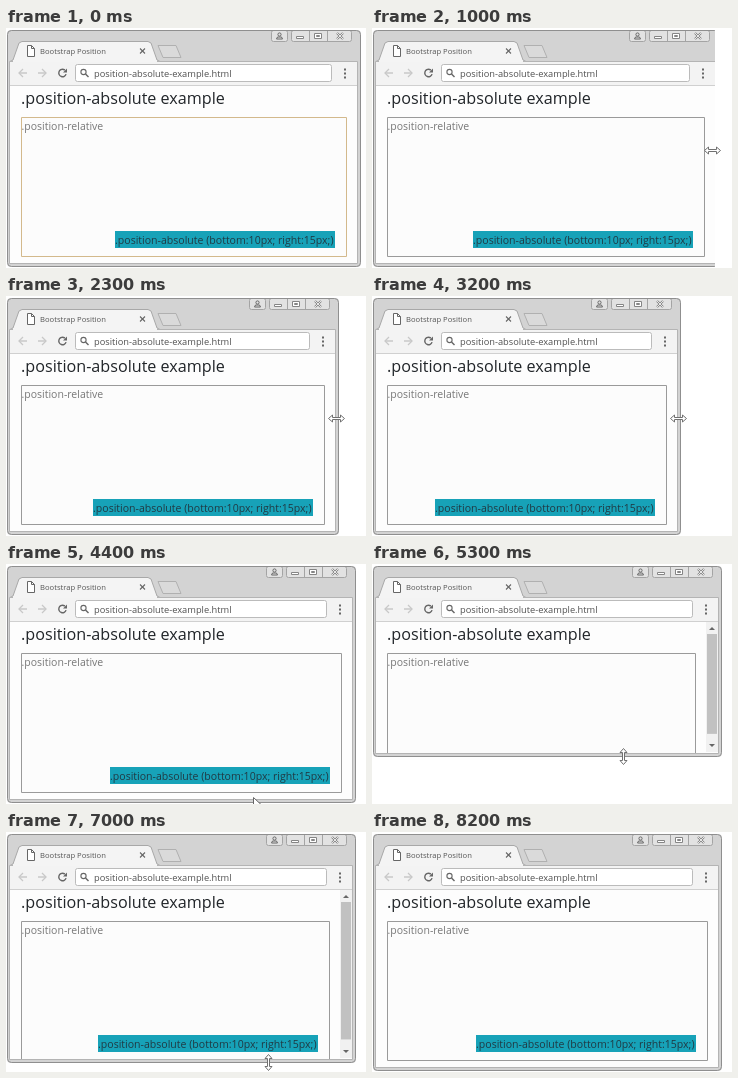
An HTML page with a canvas that plays this animation: 360 px wide and 240 px high, repeating every 8.3 s.

```html
<!DOCTYPE html>
<html lang="en">
<head>
<meta charset="utf-8">
<title>Position</title>
<style>
html, body { margin: 0; width: 100%; height: 100%; overflow: hidden; background: #fff; }
canvas { display: block; width: 360px; height: 240px; }
</style>
</head>
<body>
<canvas id="stage" width="360" height="240"></canvas>
<script>
const ctx = document.getElementById('stage').getContext('2d');
const LOOP = 8300;
const FONT = '"Open Sans", "Noto Sans", sans-serif';
const EDGE = '#8f8f8f', FRAME = '#d3d3d3', ICON = '#666', INK = '#212529';

const progress = (t, start, end) => Math.min(1, Math.max(0, (t - start) / (end - start)));
const drag = (t, start, end, distance) => distance * progress(t, start, end);

// The window is dragged in and out by its right edge, then by its bottom edge.
const rightEdge = t => Math.round(354 + drag(t, 900, 1600, -55) + drag(t, 1800, 2600, 52)
  + drag(t, 2700, 3200, -43) + drag(t, 3200, 3900, 41));
const bottomEdge = t => Math.round(238 + drag(t, 4800, 5300, -46) + drag(t, 5300, 5900, 45)
  + drag(t, 6000, 6500, -45) + drag(t, 6500, 7100, 46));

function fill(x, y, w, h, color) {
  ctx.fillStyle = color;
  ctx.fillRect(x, y, w, h);
}

function box(x, y, w, h, color, r = 0, inside = null) {
  ctx.beginPath();
  ctx.roundRect(x + .5, y + .5, w - 1, h - 1, r);
  if (inside) { ctx.fillStyle = inside; ctx.fill(); }
  ctx.strokeStyle = color;
  ctx.lineWidth = 1;
  ctx.stroke();
}

function path(points, stroke, inside = null, closed = true, width = 1) {
  ctx.beginPath();
  points.forEach(([x, y]) => ctx.lineTo(x, y));
  if (closed) ctx.closePath();
  if (inside) { ctx.fillStyle = inside; ctx.fill(); }
  if (stroke) { ctx.strokeStyle = stroke; ctx.lineWidth = width; ctx.stroke(); }
}

const line = (points, color, width = 1) => path(points, color, null, false, width);

function cross(x, y, r, color, width) {
  for (const d of [r, -r]) line([[x - r, y - d], [x + r, y + d]], color, width);
}

function ring(x, y, r, color, width, from = 0, to = Math.PI * 2) {
  ctx.beginPath();
  ctx.arc(x, y, r, from, to);
  ctx.strokeStyle = color;
  ctx.lineWidth = width;
  ctx.stroke();
}

function text(str, x, y, size, color, weight = 400) {
  ctx.font = `${weight} ${size}px ${FONT}`;
  ctx.fillStyle = color;
  ctx.fillText(str, x, y);
}

function clipped(x, y, w, h, r, paint) {
  ctx.save();
  ctx.beginPath();
  ctx.roundRect(x, y, w, h, r);
  ctx.clip();
  paint();
  ctx.restore();
}

function windowButtons(right) {
  const tone = '#a4a4a4', face = '#e2e2e2', mark = '#858585';
  box(right - 89, 2, 17, 12, tone, 2, face);
  ring(right - 80.5, 6.5, 1.6, ICON, 1);
  path([[right - 83.5, 11], [right - 82.5, 9], [right - 78.5, 9], [right - 77.5, 11]], ICON);
  box(right - 69, 2, 61, 12, tone, 2, face);
  for (const x of [51, 33]) fill(right - x, 3, 1, 10, tone);
  box(right - 64, 8, 8, 3, mark, 0, '#fff');
  box(right - 46, 5, 8, 6, mark, 0, '#fff');
  box(right - 44, 7, 4, 2, mark);
  cross(right - 20, 8, 3, mark, 2.2);
  cross(right - 20, 8, 3, '#fff', .8);
}

function tabs() {
  path([[152, 17.5], [170, 17.5], [175, 29.5], [157, 29.5]], '#b0b0b0', '#dadada');
  path([[4, 33.5], [7, 32], [13, 15], [16, 13.5], [142, 13.5], [145, 15], [151, 32], [154, 33.5]],
    '#a8a8a8', '#f4f4f4', false);
  path([[21.5, 17.5], [25.5, 17.5], [28.5, 20.5], [28.5, 28.5], [21.5, 28.5]], ICON, '#fff');
  line([[25.5, 17.5], [25.5, 20.5], [28.5, 20.5]], ICON);
  text('Bootstrap Position', 34, 26, 7.65, '#555');
  cross(136.5, 23, 2.5, ICON, 1.1);
}

function toolbar(right) {
  fill(4, 34, right - 7, 24, '#f3f3f3');
  for (const [x, d] of [[13, 1], [40, -1]]) {
    line([[x, 45], [x + 8 * d, 45]], '#c8c8c8', 1.3);
    line([[x + 4 * d, 41], [x, 45], [x + 4 * d, 49]], '#c8c8c8', 1.3);
  }
  ring(56.5, 45, 3.7, ICON, 1.4, .3, 5.4);
  path([[61, 40.5], [61, 44.5], [57, 44.5]], null, ICON);
  box(69, 36, right - 97, 18, '#bbb', 2, '#fff');
  ring(77.5, 44, 2.6, ICON, 1.1);
  line([[79.5, 46], [82.5, 49]], ICON, 1.4);
  text('position-absolute-example.html', 88, 48.5, 9.28, '#505050');
  for (let y = 41; y < 51; y += 4) fill(right - 16, y - .5, 2, 2, ICON);
  fill(4, 57, right - 7, 1, '#d0d0d0');
}

function scrollbar(x, top, end) {
  const view = end - top;
  fill(x, top, 12, view, '#f1f1f1');
  fill(x + 1, top + 12, 10, (view - 24) * view / (view + 8), '#c1c1c1');
  for (const [y, d] of [[top + 6, 1], [end - 6, -1]])
    path([[x + 3, y + 2 * d], [x + 9, y + 2 * d], [x + 6, y - d]], null, ICON);
}

function page(right, bottom, border) {
  const scrolls = bottom < 236;
  const side = right - 14 - (scrolls ? 12 : 0);
  fill(4, 58, right - 7, bottom - 61, '#fdfdfd');
  text('.position-absolute example', 15, 75.5, 16.15, INK, 500);
  box(15, 89, side - 14, 140, border, 0, '#fcfcfc');
  text('.position-relative', 15.5, 102, 10.5, '#777');
  fill(side - 231, 203, 220, 17, '#17a2b8');
  text('.position-absolute (bottom:10px; right:15px;)', side - 231, 216, 10.55, '#203a44');
  if (scrolls) scrollbar(right - 15, 58, bottom - 4);
}

function browser(right, bottom, border) {
  clipped(1, 2, right - 1 + 1, bottom - 1, 4, () => {
    fill(1, 2, right, bottom, FRAME);
    windowButtons(right);
    tabs();
    clipped(4, 34, right - 7, bottom - 37, 0, () => {
      toolbar(right);
      page(right, bottom, border);
    });
    box(3, 33, right - 5, bottom - 35, '#b4b4b4');
    // keep the selected tab joined to the toolbar
    fill(7, 33, 144, 1, '#f4f4f4');
  });
  box(1, 2, right, bottom - 1, EDGE, 4);
}

function arrow(x, y) {
  const shape = [[0, 0], [0, 10], [2.5, 8], [4, 11.5], [6, 10.5], [4.5, 7.3], [7.5, 7]];
  path(shape.map(([px, py]) => [x + px + .5, y + py + .5]), ICON, '#fff');
}

function grip(x, y, upright) {
  const tip = [[-4, 3.5], [-8, 0], [-4, -3.5], [-4, -1]];
  const shape = [[-4, 1], ...tip, ...[[-4, 1], ...tip].map(([px, py]) => [-px, -py])];
  path(shape.map(([px, py]) => upright ? [x + py + .5, y + px + .5] : [x + px + .5, y + py + .5]),
    '#707070', '#fff');
}

function pointer(t, shown, bottom) {
  if (t < 300 || t >= 7700) return;
  if (t < 600) {
    const k = progress(t, 300, 600);
    arrow(357 - 4 * k, 103 + 16 * k);
  } else if (t < 4000) {
    grip(shown - 2, 122, false);
  } else if (t < 4500) {
    const k = progress(t, 3900, 4400);
    arrow(348 - 101 * k, 122 + 111 * k);
  } else {
    const x = 244 + drag(t, 4900, 6000, 18);
    grip(Math.round(x), bottom + Math.round(drag(t, 7400, 7700, 14)), true);
  }
}

function draw(now) {
  const t = Math.floor(now % LOOP / 100) * 100;
  const right = rightEdge(t), bottom = bottomEdge(t);
  // a shrinking window is cut off slightly ahead of its contents
  const shown = Math.min(right, rightEdge(t + 50));
  fill(0, 0, 360, 240, '#fff');
  clipped(0, 0, shown + 1, 240, 0, () => browser(right, bottom, t < 1000 ? '#d3b98c' : '#9a9a9a'));
  pointer(t, shown, bottom);
  requestAnimationFrame(draw);
}
requestAnimationFrame(draw);
</script>
</body>
</html>
```
